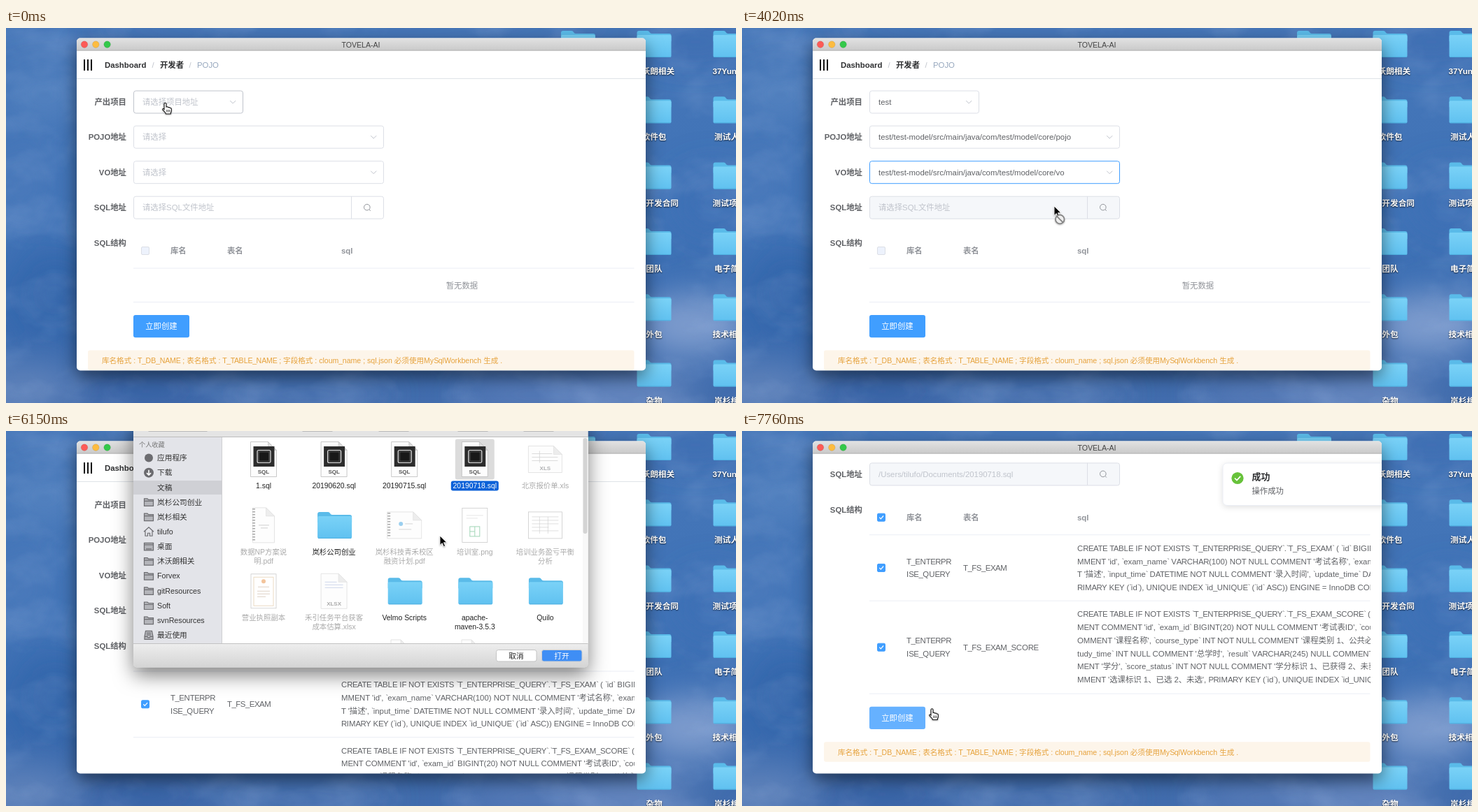
An HTML page for the animation above (8 s loop, 1043x537 px).

```html
<!DOCTYPE html>
<html lang="zh-CN">
<head>
<meta charset="utf-8">
<style>
html, body { margin: 0; width: 100%; height: 100%; overflow: hidden; background: #3f6eb0; }
svg { position: absolute; left: 0; top: 0; width: 1043px; height: 537px; overflow: hidden; }
text { font-family: "Liberation Sans", "Noto Sans CJK SC", "Noto Sans CJK", sans-serif; white-space: pre; }
.desk text { text-shadow: 0 1px 2px rgba(0,0,0,.75); }
.frame { filter: drop-shadow(0 9px 12px rgba(0,0,0,.5)); }
.sheet { filter: drop-shadow(0 11px 14px rgba(0,0,0,.5)); }
.pop { filter: drop-shadow(0 2px 4px rgba(0,0,0,.12)); }
.cursor { filter: drop-shadow(0 1px 1px rgba(0,0,0,.3)); }
</style>
</head>
<body>
<svg viewBox="0 0 1043 537">
  <defs>
    <linearGradient id="sky" x2="0" y2="1">
      <stop offset="0" stop-color="#4576b8"/><stop offset=".5" stop-color="#4073b7"/>
      <stop offset=".8" stop-color="#396bb0"/><stop offset="1" stop-color="#436dad"/>
    </linearGradient>
    <linearGradient id="folder" x2="0" y2="1">
      <stop offset="0" stop-color="#7ad2f7"/><stop offset="1" stop-color="#60c1f0"/>
    </linearGradient>
    <linearGradient id="bar" x2="0" y2="1">
      <stop offset="0" stop-color="#e2e2e2"/><stop offset="1" stop-color="#c9c9c9"/>
    </linearGradient>
    <linearGradient id="foot" x2="0" y2="1">
      <stop offset="0" stop-color="#eeeeee"/><stop offset="1" stop-color="#d4d4d4"/>
    </linearGradient>
    <filter id="soft" x="-60%" y="-60%" width="220%" height="220%"><feGaussianBlur stdDeviation="24"/></filter>
    <filter id="haze" x="0" y="0" width="100%" height="100%" color-interpolation-filters="sRGB">
      <feTurbulence type="fractalNoise" baseFrequency=".011 .016" numOctaves="4" seed="8"/>
      <feColorMatrix values="0 0 0 0 .68  0 0 0 0 .77  0 0 0 0 .92  1.4 0 0 0 -.6"/>
    </filter>
    <clipPath id="page"><path d="M101 32.500H914V485.500a5 5 0 0 1-5 5H106a5 5 0 0 1-5-5z"/></clipPath>
    <clipPath id="table"><rect x="182" y="300" width="716" height="300"/></clipPath>
    <clipPath id="files"><rect x="309" y="9" width="522" height="295"/></clipPath>
  </defs>
  <rect width="1043" height="537" fill="url(#sky)"/>
  <g id="clouds" filter="url(#soft)"></g>
  <rect width="1043" height="537" filter="url(#haze)" opacity=".35"/>
  <g id="desk" class="desk"></g>
  <rect class="frame" x="101" y="14.500" width="813" height="476" rx="5" fill="#fff"/>
</svg>
<svg id="app" viewBox="0 0 1043 537"></svg>

<script>
const $ = id => document.getElementById(id);
const many = (list, fn) => list.map(fn).join('');

// Code text sets its narrow capitals a little closer.
const tighten = s => s.replace(/[AEFPRSTXY_]+|`/g, m =>
  `<tspan letter-spacing="${m === '`' ? -.1 : -.04}em">${m}</tspan>`);

function text(x, cy, s, o = {}) {
  const { size = 11.38, fill = '#606266', bold, code, at = 'start' } = o;
  return `<text x="${x}" y="${cy + size * .35}" font-size="${size}" fill="${fill}"` +
    ` font-weight="${bold ? 700 : 400}" text-anchor="${at}">${code ? tighten(s) : s}</text>`;
}
const box = (x, y, w, h, fill, more = '') =>
  `<rect x="${x}" y="${y}" width="${w}" height="${h}" fill="${fill}" ${more}/>`;
const line = (d, stroke, w = 1, more = 'fill="none"') => `<path d="${d}" stroke="${stroke}" stroke-width="${w}" ${more}/>`;
const dot = (x, y, r, fill, more = '') => `<circle cx="${x}" cy="${y}" r="${r}" fill="${fill}" ${more}/>`;
const rule = y => line(`M182 ${y}H897.500`, '#ebeef5');

function folder(x, y) {
  return `<g transform="translate(${x} ${y})">
    <path d="M0 3q0-3 3-3h12q2 0 3 2t3 2h25q3 0 3 3v8H0z" fill="#5abbe9"/>
    <rect y="6" width="49" height="32" rx="2" fill="url(#folder)"/>
    <path d="M1 37.500H48" stroke="#4fb0e0"/></g>`;
}

// Desktop
const clouds = [
  [55, 95, 60, 40, '#6790c8', .45], [20, 225, 45, 60, '#5783c0', .4], [70, 380, 60, 60, '#2f61a5', .6],
  [25, 515, 80, 35, '#7492c3', .6], [200, 520, 90, 25, '#335d9f', .6], [430, 525, 130, 20, '#4a70ae', .6],
  [760, 525, 110, 25, '#6484be', .7], [980, 425, 80, 45, '#94acd7', .75], [900, 525, 80, 35, '#7f99cb', .6],
  [1010, 250, 60, 50, '#3c6fb5', .6], [985, 20, 80, 30, '#3c6cb0', .6], [500, 0, 400, 20, '#4a79ba', .5]
];
$('clouds').innerHTML = many(clouds, ([x, y, rx, ry, c, o]) =>
  `<ellipse cx="${x}" cy="${y}" rx="${rx}" ry="${ry}" fill="${c}" opacity="${o}"/>`);

const deskNames = [
  ['沐沃朗相关', '37YunKeShi'], ['软件包', '测试人员'], ['软件开发合同', '测试项目'],
  ['团队', '电子简历'], ['外包', '技术相关'], ['杂物', '岚杉相关']
];
$('desk').innerHTML = folder(793, 4) + many(deskNames, ([a, b], i) => {
  const y = 4 + i * 94.3, o = { size: 11.7, fill: '#fff', bold: true };
  return folder(901.5, y) + folder(1010.5, y) +
    text(926, y + 58, a, { ...o, at: 'middle' }) + text(i % 2 ? 1012 : 1009.5, y + 58, b, o);
});

// Form
const base = 'test/test-model/src/main/java/com/test/model/';
const fields = {
  proj: { cy: 106, w: 156, hint: '请选择项目地址', popW: 156, items: ['test', 'demo'] },
  pojo: { cy: 156.2, w: 357, hint: '请选择', popW: 369, items:
    ['admin/system', 'base/mongo', 'base', 'core/mongo', 'core'].map(s => base + s + '/pojo') },
  vo: { cy: 206.7, w: 357, hint: '请选择', popW: 359, items:
    ['admin/system', 'base', 'core/mongo', 'core'].map(s => base + s + '/vo') }
};
const sqlRows = [
  { top: 344, end: 438.5, name: 'T_FS_EXAM', lines: [
    'CREATE TABLE IF NOT EXISTS `T_ENTERPRISE_QUERY`.`T_FS_EXAM` ( `id` BIGINT(20)',
    "MMENT 'id', `exam_name` VARCHAR(100) NOT NULL COMMENT '考试名称', `exam_desc`",
    "T '描述', `input_time` DATETIME NOT NULL COMMENT '录入时间', `update_time` DATETIME",
    'RIMARY KEY (`id`), UNIQUE INDEX `id_UNIQUE` (`id` ASC)) ENGINE = InnoDB COMMENT'] },
  { top: 438.5, end: 571.5, name: 'T_FS_EXAM_SCORE', lines: [
    'CREATE TABLE IF NOT EXISTS `T_ENTERPRISE_QUERY`.`T_FS_EXAM_SCORE` ( `id` BIGINT',
    "MENT COMMENT 'id', `exam_id` BIGINT(20) NOT NULL COMMENT '考试表ID', `course_name`",
    "OMMENT '课程名称', `course_type` INT NOT NULL COMMENT '课程类别 1、公共必修课",
    "tudy_time` INT NULL COMMENT '总学时', `result` VARCHAR(245) NULL COMMENT",
    "MENT '学分', `score_status` INT NOT NULL COMMENT '学分标识 1、已获得 2、未获得",
    "MMENT '选课标识 1、已选 2、未选', PRIMARY KEY (`id`), UNIQUE INDEX `id_UNIQUE`"] }
];

const label = (cy, s) => text(172, cy, s, { bold: true, at: 'end' });

function select(key, s) {
  const { cy, w, hint } = fields[key], value = s[key];
  const edge = s.focus === key ? '#409eff' : s.hover === key ? '#c0c4cc' : '#dcdfe6';
  const turn = s.open !== key ? 0 : s.opening ? -135 : 180;
  return box(182.5, cy - 16, w, 32, '#fff', `rx="3" stroke="${edge}"`) +
    text(195, cy, value || hint, { fill: value ? '#606266' : '#c0c4cc' }) +
    (s.caret === key ? line(`M195.500 ${cy - 6.5}v13`, '#333') : '') +
    `<g transform="translate(${182.5 + w - 14.3} ${cy}) rotate(${turn})">${line('M-4-2L0 2 4-2', '#c0c4cc')}</g>`;
}

function popup(s) {
  const f = fields[s.open];
  if (!f) return '';
  const y = f.cy + 26.3, h = 11.3 + 26.2 * f.items.length;
  return `<g class="pop">${box(182.5, y, f.popW, h, '#fff', 'rx="3" stroke="#e4e7ed"')}
    <path d="M211 ${y + .6}l5.500-5 5.500 5" fill="#fff" stroke="#ebeef5"/></g>` +
    many(f.items, (item, i) => {
      const cy = y + 18.6 + 26.2 * i;
      return (s.row === i ? box(183, cy - 13, f.popW - 1, 26.2, '#f5f7fa') : '') + text(199, cy, item);
    });
}

function check(cy, on) {
  return box(193.500, cy - 5.5, 11, 11, on ? '#409eff' : '#edf2fc', `rx="1.500" stroke="${on ? '#409eff' : '#dcdfe6'}"`) +
    (on ? line(`M196.300 ${cy}l2 2.200 3.800-4.400`, '#fff', 1.2) : '');
}

function table(s) {
  const o = { bold: true, fill: '#909399' }, code = { code: true };
  const head = check(319, s.file) + text(235, 319, '库名', o) + text(316, 319, '表名', o) + text(479, 319, 'sql', o) + rule(344);
  if (!s.file) return head + text(651.5, 369, '暂无数据', { fill: '#909399', at: 'middle' }) + rule(392.5);
  return head + `<g clip-path="url(#table)">` + many(sqlRows, r => {
    const mid = (r.top + r.end) / 2;
    return check(mid, true) + text(235, mid - 9.4, 'T_ENTERPR', code) + text(235, mid + 9.4, 'ISE_QUERY', code) +
      text(316, mid, r.name, code) + many(r.lines, (l, i) => text(479, r.top + 19.3 + i * 18.7, l, code)) + rule(r.end);
  }) + '</g>';
}

function page(s) {
  const bg = s.lock ? '#f5f7fa' : '#fff', drop = s.file ? 179 : 0;
  const crumb = { bold: true, fill: '#303133' }, slash = { fill: '#c0c4cc' };
  return many([112, 117, 122], x => box(x - 1, 45, 2, 16, '#111')) +
    text(141, 53, 'Dashboard', crumb) + text(208.5, 53, '/', slash) + text(220, 53, '开发者', crumb) +
    text(261.5, 53, '/', slash) + text(273, 53, 'POJO', { fill: '#97a8be' }) + line('M101 72.500H914', '#dfe3e8') +
    label(106, '产出项目') + label(156.2, 'POJO地址') + label(206.7, 'VO地址') + label(257.2, 'SQL地址') + label(308, 'SQL结构') +
    many(Object.keys(fields), k => select(k, s)) +
    box(182.5, 241.2, 357, 32, bg, 'rx="3" stroke="#dcdfe6"') + line('M493.500 241V273', '#dcdfe6') +
    text(195, 257.2, s.file ? '/Users/tilufo/Documents/20190718.sql' : '请选择SQL文件地址', { fill: '#c0c4cc' }) +
    dot(515.8, 256.7, 4.3, 'none', 'stroke="#909399"') + line('M519 260l1.800 1.800', '#909399') +
    table(s) +
    box(182, 411 + drop, 80, 32.3, s.btn || '#409eff', 'rx="3"') +
    text(222, 427.3 + drop, '立即创建', { fill: '#fff', at: 'middle' }) +
    box(117, 461.5 + drop, 780.5, 28.5, '#fdf5ea', 'rx="3"') +
    text(137, 476.3 + drop, '库名格式 : T_DB_NAME ; 表名格式 : T_TABLE_NAME ; 字段格式 : cloum_name ; ' +
      'sql.json 必须使用MySqlWorkbench 生成 .', { size: 10.57, fill: '#e6a23c', code: true }) +
    popup(s);
}

function notice(x) {
  return `<g class="pop">${box(x, 46, 268, 60.5, '#fff', 'rx="6" stroke="#ebeef5"')}</g>` +
    dot(x + 21, 67.5, 8.6, '#67c23a') + line(`M${x + 17} 67.500l3 3 5.200-5.600`, '#fff', 1.7) +
    text(x + 41.5, 65.5, '成功', { size: 13, bold: true, fill: '#303133' }) + text(x + 41.5, 86, '操作成功');
}

function titlebar(off) {
  const colors = off ? ['#d0d0d0', '#d0d0d0', '#d0d0d0'] : ['#fc5b57', '#fdbc40', '#34c84a'];
  return `<path d="M101 32.500V19.500a5 5 0 0 1 5-5H909a5 5 0 0 1 5 5V32.500z" fill="${off ? '#f4f4f4' : 'url(#bar)'}"/>` +
    line('M101 32H914', off ? '#dadada' : '#b4b4b4') +
    many(colors, (c, i) => dot(112 + i * 16.3, 23.6, 4.8, c, 'stroke="#000" stroke-opacity=".15" stroke-width=".6"')) +
    text(507, 24, 'TOVELA-AI', { size: 10.6, fill: off ? '#aaa' : '#444', at: 'middle' });
}

// File dialog
const places = [
  ['app', '应用程序'], ['down', '下载'], ['', '文稿'], ['dir', '岚杉公司创业'], ['dir', '岚杉相关'], ['home', 'tilufo'],
  ['screen', '桌面'], ['dir', '沐沃朗相关'], ['dir', 'Forvex'], ['dir', 'gitResources'], ['dir', 'Soft'],
  ['dir', 'svnResources'], ['recent', '最近使用']
];
const grey = '#6c6c70', solid = 'fill="#b4b5ba"';
const glyphs = {
  '': '', app: dot(0, 0, 6, grey),
  down: dot(0, 0, 7, grey) + line('M0-4V3M-3 .500L0 3.500 3 .500', '#fff', 1.6),
  dir: line('M-6.500-5H-2l1.500 1.500H6.500V5.500H-6.500zM-6.500-1.500H6.500', grey, 1.2, solid),
  home: line('M-7 0L0-6.500 7 0M-5-1V6H-1.500V2H1.500V6H5V-1', grey, 1.2),
  screen: line('M-6.500-5H6.500V5.500H-6.500zM-6.500-2.500H6.500M-4 3.500H4', grey, 1.3, solid),
  recent: line('M-4.500-6H4.500L6 2V6H-6V2zM-6 2H-2l1 1.500H1L2 2H6M-3-3H3M-3-.500H3', grey, 1.2, solid)
};
const files = [
  ['sql', '1.sql'], ['sql', '20190620.sql'], ['sql', '20190715.sql'], ['sql', '20190718.sql'], ['xls', '北京报价单.xls'],
  ['pdf', '数据NP方案说', '明.pdf'], ['dir', '岚杉公司创业'], ['deck', '岚杉科技青禾校区', '融资计划.pdf'], ['plan', '培训室.png'], ['grid', '培训业务盈亏平衡', '分析'],
  ['card', '营业执照副本'], ['xlsx', '禾引任务平台获客', '成本估算.xlsx'], ['dir', 'Velmo Scripts'], ['dir', 'apache-', 'maven-3.5.3'], ['dir', 'Quilo']
];
const paper = (w, h) => `<path d="M${-w / 2} ${-h / 2}H${w / 2 - 12}L${w / 2} ${12 - h / 2}V${h / 2}H${-w / 2}z" fill="#fdfdfd" stroke="#bbb" stroke-width=".8"/>
  <path d="M${w / 2 - 12} ${-h / 2}v12h12z" fill="#ddd" stroke="#bbb" stroke-width=".6"/>`;
const sheet = (w, h) => box(-w / 2, -h / 2, w, h, '#fff', 'stroke="#999" stroke-width=".8"');
const tag = s => text(0, 17.5, s, { size: 8, fill: '#555', bold: true, at: 'middle' });
const rings = (x, h) => line(`M${x} ${-h / 2}V${h / 2}`, '#555', 4, 'stroke-dasharray="1.600 2.400"');
const icons = {
  sql: paper(37, 50) + box(-14.5, -18.5, 30, 29, '#2c2c2c') +
    box(-9, -13, 19, 18, '#3c3c3c', 'rx="2" stroke="#ddd" stroke-width="1.200"') + box(-6, -10, 13, 12, '#181818', 'rx="1"') + tag('SQL'),
  xls: paper(48, 38) + line('M-19-8H10M-19-3H18M-19 2H18M-8-12V5', '#aaa', .8) + text(0, 12.5, 'XLS', { size: 8, bold: true, at: 'middle' }),
  xlsx: paper(37, 50) + line('M-13-13H4M-13-9H13M-13-5H13', '#8aa0d0', .8) + tag('XLSX'),
  pdf: paper(31, 50) + rings(-14, 48) + line('M-7 0H8M-4 4H6', '#888', .8),
  deck: paper(49, 38) + rings(-22, 36) + dot(-5, -2, 3, '#3aa0e0') + line('M1-2H12M-8 6H10', '#999', .8),
  plan: sheet(36, 49) + line('M-12-14H12M-12-10H4', '#bbb', .7) + box(-7, 2, 14, 14, 'none', 'stroke="#48b070"') + line('M-7 9H0M0 2V16', '#48b070'),
  grid: sheet(48, 38) + line('M-19-12H19M-19-7H19M-19-2H19M-19 3H5M-19 8H19M-8-12V12M4-12V12', '#aaa', .7),
  card: sheet(36, 49) + box(-14, -20, 28, 41, 'none', 'stroke="#d9b98c"') + dot(0, -14, 3, '#e88a3c') + line('M-8-6H8M-9 0H9M-9 4H9M-9 8H3', '#b09070', .8)
};

function fileItem([kind, ...names], i, chosen) {
  const x = 368 + i % 5 * 100.6, y = 40.5 + Math.floor(i / 5) * 94.4;
  const on = chosen && names[0] === '20190718.sql', live = kind === 'sql' || kind === 'dir';
  return (on ? box(x - 28, y - 29, 56, 58, '#dcdcdc', 'rx="3"') + box(x - 34, y + 31, 68, 14, '#0b61d8', 'rx="3"') : '') +
    (kind === 'dir' ? folder(x - 23.5, y - 19) :
      `<g transform="translate(${x} ${y})" opacity="${live ? 1 : .5}">${icons[kind]}</g>`) +
    many(names, (n, k) => text(x, y + 38 + k * 13, n,
      { size: 10.4, at: 'middle', fill: on ? '#fff' : live ? '#222' : '#aaa' }));
}

function dialog(s) {
  if (!s.dialog) return '';
  const chosen = s.dialog === 'chosen';
  return `<path class="sheet" d="M182-20H831.500V333.500a5 5 0 0 1-5 5H187a5 5 0 0 1-5-5z" fill="#eee"/>` +
    box(182, -1, 649.5, 9.5, '#e4e4e4') + many([204, 245, 424, 533, 646, 740], x => box(x, -4, 42, 4.5, '#fafafa', 'stroke="#bbb"')) +
    line('M182 8.500H831.500', '#bcbcbc') +
    box(182, 9, 126.5, 295, '#e3e4e9') + box(182, 71, 126.5, 20, '#cfd0d5') + box(309, 9, 522.5, 295, '#fff') +
    line('M308.500 9V304', '#cfcfd2') + text(190, 19.5, '个人收藏', { size: 9.2, fill: '#777' }) +
    many(places, ([kind, name], i) => {
      const y = 38.5 + i * 21.15;
      return `<g transform="translate(204 ${y})">${glyphs[kind]}</g>` + text(216, y, name, { size: 10.7, fill: '#333' });
    }) +
    `<g clip-path="url(#files)">` + many(files, (f, i) => fileItem(f, i, chosen)) +
    many([563, 664], x => `<g transform="translate(${x} 324)" opacity=".5">${paper(26, 50)}</g>`) + '</g>' +
    box(824, 9, 7.5, 295, '#f8f8f8') + box(824.5, 10, 6, 137, '#d4d4d4', 'rx="3"') +
    `<path d="M182 304H831.500V333.500a5 5 0 0 1-5 5H187a5 5 0 0 1-5-5z" fill="url(#foot)"/>` + line('M182 304.500H831.500', '#c2c2c2') +
    box(700.5, 313.5, 57.5, 16.5, '#fff', 'rx="3" stroke="#c4c4c4"') + text(729, 322, '取消', { size: 10.7, fill: '#222', at: 'middle' }) +
    box(765.5, 313.5, 57.5, 16.5, chosen ? '#3f8ef5' : '#ededed', 'rx="3" stroke="#cfcfcf"') +
    text(794, 322, '打开', { size: 10.7, fill: chosen ? '#fff' : '#b4b4b4', at: 'middle' });
}

function cursor([kind, x, y]) {
  const arrow = '<path d="M0 0V13.500L3.200 10.600 5.400 15.600 7.600 14.600 5.400 9.800H9.800z" fill="#000" stroke="#fff" stroke-width=".9"/>';
  const hand = `<path d="M-1.500 1.200a1.500 1.500 0 0 1 3 0V5.600q2-1 2.600.600 2-.800 2.500.800 2.200-.400 2.200 1.600v2.500q0 1.500-1 2.800V15.500H.800l-.400-1.500L-3.600 9.600q-.600-1.800 1-1.600l1.100 1.200z"
    fill="#fff" stroke="#111" stroke-width="1.100"/>` + line('M2.200 9.500V13M4.200 9.500V13M6.200 9.500V13', '#222', .8);
  const ban = dot(8.2, 19, 6.3, '#eee', 'stroke="#858585" stroke-width="1.800"') + line('M3.800 14.600l8.800 8.800', '#858585', 1.8);
  return `<g class="cursor" transform="translate(${x} ${y})">${kind === 'hand' ? hand : arrow}${kind === 'ban' ? ban : ''}</g>`;
}

const scene = s => `<g clip-path="url(#page)"><g transform="translate(0 ${-(s.scroll || 0)})">${page(s)}</g>` +
  (s.notice ? notice(s.notice) : '') + '</g>' + titlebar(s.inactive) + dialog(s) + cursor(s.cur);

// Each step changes only the listed parts of the state.
const steps = [
  [0, { cur: ['hand', 227.5, 107.5], hover: 'proj' }],
  [270, { focus: 'proj', open: 'proj', opening: true }],
  [530, { cur: ['hand', 241, 166], opening: false, row: 1 }],
  [800, { cur: ['hand', 206, 150], row: 0 }],
  [1070, { proj: 'test', open: '', row: -1, hover: '' }],
  [1340, { cur: ['hand', 480, 150], hover: 'pojo' }],
  [1610, { cur: ['hand', 504, 145], focus: 'pojo', open: 'pojo', opening: true, caret: 'pojo', lock: true }],
  [1880, { cur: ['hand', 470, 230], opening: false, row: 1, hover: '' }],
  [2140, { cur: ['hand', 440, 304], row: 4 }],
  [2680, { cur: ['ban', 446, 250], pojo: base + 'core/pojo', open: '', caret: '', row: -1 }],
  [2950, { cur: ['hand', 449, 220.5], hover: 'vo' }],
  [3220, { focus: 'vo', open: 'vo', opening: true, caret: 'vo' }],
  [3480, { cur: ['hand', 446, 328], opening: false, row: 3, hover: '' }],
  [3750, { cur: ['arrow', 446, 333], vo: base + 'core/vo', open: '', caret: '', row: -1 }],
  [4020, { cur: ['ban', 446, 255] }],
  [4290, { cur: ['ban', 484, 252], focus: '' }],
  [4550, { cur: ['hand', 514, 254] }],
  [4820, { cur: ['arrow', 522, 290] }],
  [5090, { cur: ['arrow', 523, 271], dialog: 'open', inactive: true }],
  [5350, { cur: ['arrow', 558, 145] }],
  [5620, { cur: ['arrow', 665, 49] }],
  [5890, { dialog: 'chosen' }],
  [6150, { cur: ['arrow', 620, 150], inactive: false, file: true }],
  [6420, { cur: ['arrow', 493.5, 311], dialog: '' }],
  [6690, { scroll: 110 }],
  [6960, { cur: ['arrow', 436, 334], scroll: 195.3 }],
  [7230, { cur: ['arrow', 204, 431] }],
  [7500, { cur: ['hand', 240, 403], btn: '#3a8ee6' }],
  [7760, { cur: ['hand', 271.5, 398], btn: '#66b1ff', notice: 687 }]
];
const states = steps.map((_, i) => Object.assign({}, ...steps.slice(0, i + 1).map(s => s[1])));

const start = performance.now();
let shown = -1;
function tick() {
  const t = (performance.now() - start) % 8000;
  const i = steps.findLastIndex(s => s[0] <= t);
  if (i !== shown) $('app').innerHTML = scene(states[shown = i]);
  requestAnimationFrame(tick);
}
tick();
</script>
</body>
</html>
```
